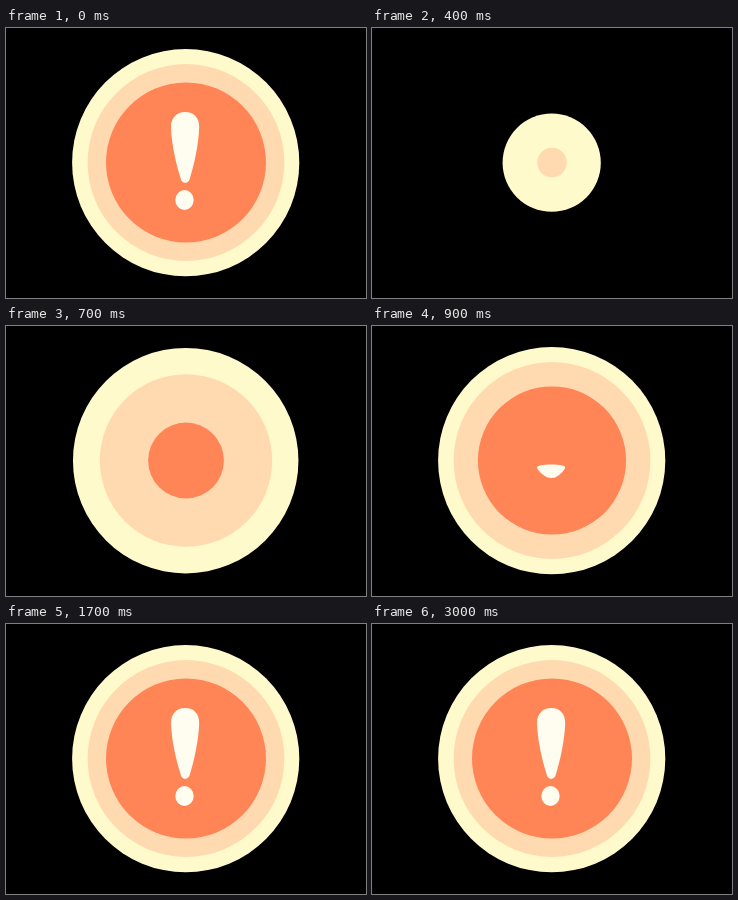
An HTML page for the animation above (3.1 s loop, 360 by 270 pixels).

```html
<!DOCTYPE html>
<html lang="en">
<head>
<meta charset="utf-8">
<title>Alert badge</title>
<style>
  html, body { margin: 0; width: 100%; height: 100%; overflow: hidden; background: #000; }
  svg { display: block; width: 360px; height: 270px; }
</style>
</head>
<body>
<svg viewBox="0 0 360 270">
  <circle id="outer" cx="179.7" cy="134.7" r="113.6" fill="#fffacb"/>
  <circle id="middle" cx="180" cy="134.5" r="98.4" fill="#ffdab1"/>
  <circle id="inner" cx="180" cy="134.5" r="80" fill="#ff8456"/>
  <path id="bar" fill="#fffdf0" d="M179.2 84C188 84 193.4 90 193.2 99C192.800 116 188 137 184 150C182.500 156.500 175.800 156.500 174.500 150C170.500 137 165.300 116 165 99C165 90 170.500 84 179.200 84Z"/>
  <ellipse id="dot" cx="178.5" cy="172" rx="9.2" ry="10" fill="#fffdf0"/>
</svg>
<script>
  const LOOP = 3100, STEP = 100;

  // start and duration in ms, then the fixed point of the scaling
  const parts = [
    { id: 'outer', start: 124, length: 607, x: 179.7, y: 134.7 },
    { id: 'middle', start: 263, length: 560, x: 180, y: 134.5 },
    { id: 'inner', start: 425, length: 570, x: 180, y: 134.5 },
    { id: 'bar', start: 674, length: 808, x: 179, y: 151.3, tall: true },
    { id: 'dot', start: 900, length: 400, x: 178.5, y: 172 }
  ].map(p => ({ ...p, el: document.getElementById(p.id) }));

  const ease = u => u * u * (3 - 2 * u);
  const clamp = u => Math.min(1, Math.max(0, u));

  function draw(t) {
    for (const { el, start, length, x, y, tall } of parts) {
      // the finished badge is held for the first step of each loop
      const s = t < STEP ? 1 : ease(clamp((t - start) / length));
      el.style.display = s < 0.05 ? 'none' : '';
      el.setAttribute('transform',
        `translate(${x} ${y}) scale(${tall ? 1 : s} ${s}) translate(${-x} ${-y})`);
    }
  }

  const begin = performance.now();
  function tick() {
    const t = (performance.now() - begin) % LOOP;
    draw(Math.floor(t / STEP) * STEP);
    requestAnimationFrame(tick);
  }
  tick();
</script>
</body>
</html>
```
